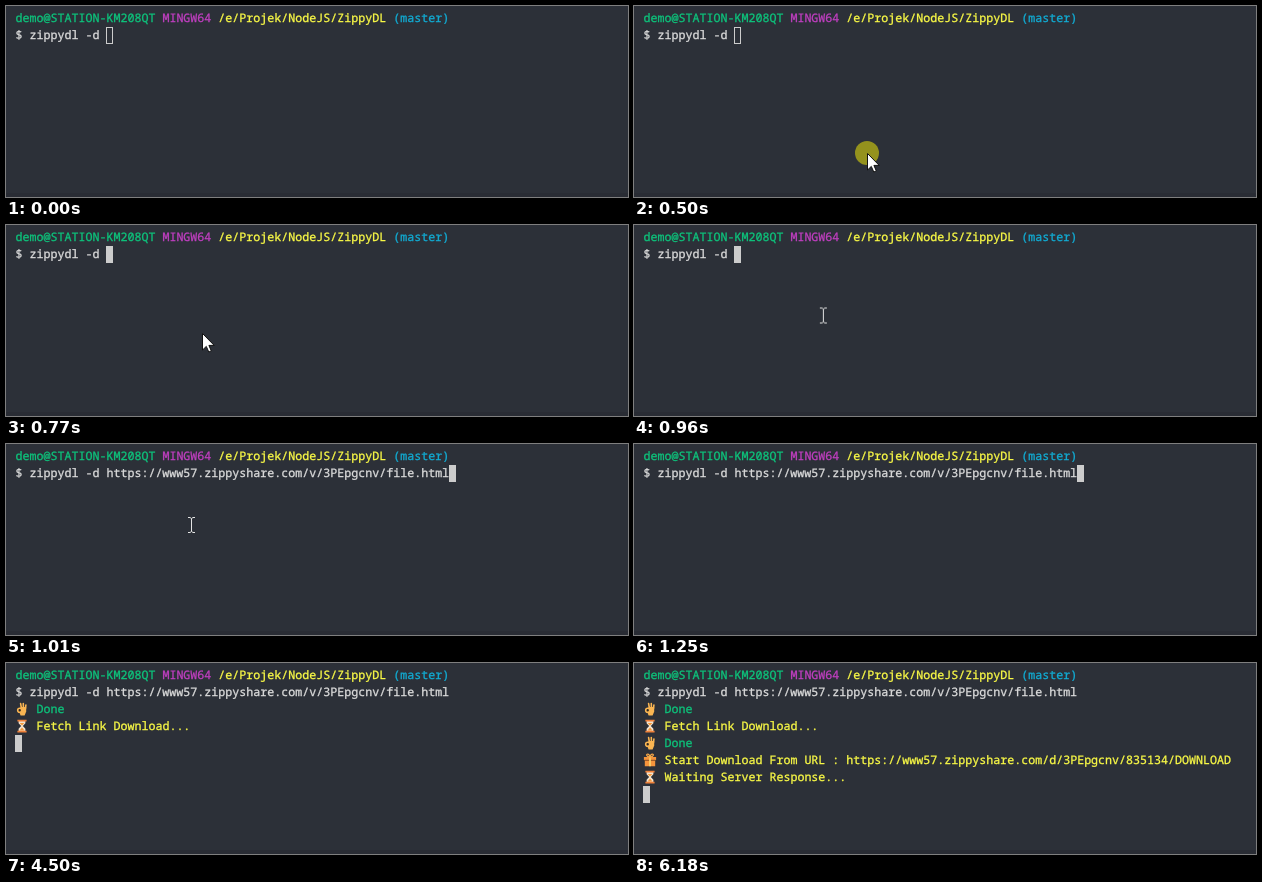
An HTML page for the animation above (8000 ms loop, 622 by 191 pixels).

```html
<!DOCTYPE html>
<html lang="en">
<head>
<meta charset="utf-8">
<title>Terminal download</title>
<style>
html, body { margin: 0; width: 100%; height: 100%; overflow: hidden; background: #2c3038; }
#stage { position: relative; width: 622px; height: 191px; overflow: hidden; background: #2c3038; }
#edge { position: absolute; left: 0; right: 0; top: 187px; bottom: 0; background: #292c34; }
#term {
  position: absolute; left: 9px; top: 4px; color: #dcdcdc;
  font: 11.6667px/17px "Noto Sans Mono", "DejaVu Sans Mono", monospace;
  text-rendering: geometricPrecision; font-kerning: none; font-variant-ligatures: none;
  -webkit-text-stroke: .3px currentColor;
}
.row { position: relative; left: .5px; height: 17px; white-space: pre; }
.log { padding-left: 21px; }
.log svg { position: absolute; left: -.5px; top: 1px; width: 14px; height: 14px; }
.g { color: #0dc47c; }
.m { color: #c03fc0; }
.y { color: #fafa46; }
.c { color: #11acd4; }

#caret {
  position: absolute; left: 0; top: 0; width: 7px; height: 17px; box-sizing: border-box;
  border: 1px solid #ccc; animation: caret 8s step-end infinite;
}
#url { animation: url 8s step-end infinite; }
.first { animation: first 8s step-end infinite; }
.second { animation: second 8s step-end infinite; }

#over { position: absolute; left: 0; top: 0; }
#mouse { animation: path 8s linear infinite; }
#shown { animation: shown 8s step-end infinite; }
#click { animation: click 8s step-end infinite; }
#arrow { animation: arrow 8s step-end infinite; }
#beam { animation: beam 8s step-end infinite; }

@keyframes caret {
  0% { transform: translate(91px, 17px); background: transparent; }
  7.25% { transform: translate(91px, 17px); background: #ccc; }
  12.125% { transform: translate(434px, 17px); background: #ccc; }
  28.375% { transform: translate(0, 34px); background: #ccc; }
  56.25% { transform: translate(0, 68px); background: #ccc; }
  77.25%, 100% { transform: translate(0, 119px); background: #ccc; }
}
@keyframes url { 0% { opacity: 0; } 12.125%, 100% { opacity: 1; } }
@keyframes first { 0% { opacity: 0; } 56.25%, 100% { opacity: 1; } }
@keyframes second { 0% { opacity: 0; } 77.25%, 100% { opacity: 1; } }
@keyframes shown { 0% { opacity: 0; } 4.25% { opacity: 1; } 15.625%, 100% { opacity: 0; } }
@keyframes click { 0% { opacity: 0; } 5.25% { opacity: 1; } 7.25%, 100% { opacity: 0; } }
@keyframes arrow { 0% { opacity: 1; } 11.625%, 100% { opacity: 0; } }
@keyframes beam { 0% { opacity: 0; } 11.625%, 100% { opacity: 1; } }
@keyframes path {
  0%, 4.25% { transform: translate(244px, 180px); }
  6.25%, 6.75% { transform: translate(233px, 147px); }
  9.625%, 10.875% { transform: translate(196px, 108px); }
  12.625%, 13.5% { transform: translate(185px, 81px); }
  14.25% { transform: translate(194px, 110px); }
  15.25%, 100% { transform: translate(224px, 176px); }
}
</style>
</head>
<body>
<svg width="0" height="0" style="position:absolute">
  <symbol id="ok" viewBox="0 0 14 14">
    <path d="M6.3 5.5L5.6 1.6M8.4 6L8.3 1.6M10.4 7L10.9 3" fill="none" stroke="#f9b552" stroke-width="1.6" stroke-linecap="round"/>
    <path d="M5.6 5H11.2V9.4L9.6 13.4H5.6L4.6 11Z" fill="#f9b552"/>
    <circle cx="4.7" cy="8.2" r="2" fill="#2c2620" stroke="#f9b552" stroke-width="1.6"/>
  </symbol>
  <symbol id="glass" viewBox="0 0 14 14">
    <path d="M3.6 2H10.4V4.3L7.9 7L10.4 9.7V12H3.6V9.7L6.1 7L3.6 4.3Z" fill="#f4e3cf"/>
    <path d="M4.7 4H9.3L7 6.6ZM7 8.4L9.5 11.5H4.5Z" fill="#f59a3a"/>
    <path d="M2.4 1.6H11.6M2.4 12.6H11.6" stroke="#f0813a" stroke-width="1.7"/>
  </symbol>
  <symbol id="gift" viewBox="0 0 14 14">
    <path d="M.9 4H13.1V7H12.2V13.2H1.8V7H.9Z" fill="#f4943c"/>
    <path d="M1.4 7.3H12.6" stroke="#7a4420" stroke-width=".9"/>
    <path d="M7 4V13.2" stroke="#fbd06a" stroke-width="1.8"/>
    <path d="M7 3.8C3 4 3 .6 5 1.1Q6.4 1.5 7 3.8Q7.6 1.5 9 1.1C11 .6 11 4 7 3.8" fill="none" stroke="#f7a848" stroke-width="1.3"/>
  </symbol>
</svg>

<div id="stage">
  <div id="edge"></div>
  <div id="term">
    <div class="row"><span class="g">demo@STATION-KM208QT</span> <span class="m">MINGW64</span> <span class="y">/e/Projek/NodeJS/ZippyDL</span> <span class="c">(master)</span></div>
    <div class="row">$ zippydl -d <span id="url">https://www57.zippyshare.com/v/3PEpgcnv/file.html</span></div>
    <div class="row log g first"><svg><use href="#ok"/></svg>Done</div>
    <div class="row log y first"><svg><use href="#glass"/></svg>Fetch Link Download...</div>
    <div class="row log g second"><svg><use href="#ok"/></svg>Done</div>
    <div class="row log y second"><svg><use href="#gift"/></svg>Start Download From URL : https://www57.zippyshare.com/d/3PEpgcnv/835134/DOWNLOAD</div>
    <div class="row log y second"><svg><use href="#glass"/></svg>Waiting Server Response...</div>
    <div id="caret"></div>
  </div>
  <svg id="over" width="622" height="191">
    <g id="shown">
      <g id="mouse">
        <circle id="click" r="12" fill="#94921d"/>
        <path id="arrow" d="M.5 .5V17L4.3 13.4L6.8 19L9.3 17.9L6.9 12.4H12.2Z" fill="#fff" stroke="#111" stroke-width="1"/>
        <path id="beam" d="M-3 -7.5H-1L.5 -6.5L2 -7.5H4M.5 -6.5V6.5M-3 7.5H-1L.5 6.5L2 7.5H4" fill="none" stroke="#e4e4e4" stroke-width="1"/>
      </g>
    </g>
  </svg>
</div>
</body>
</html>
```
